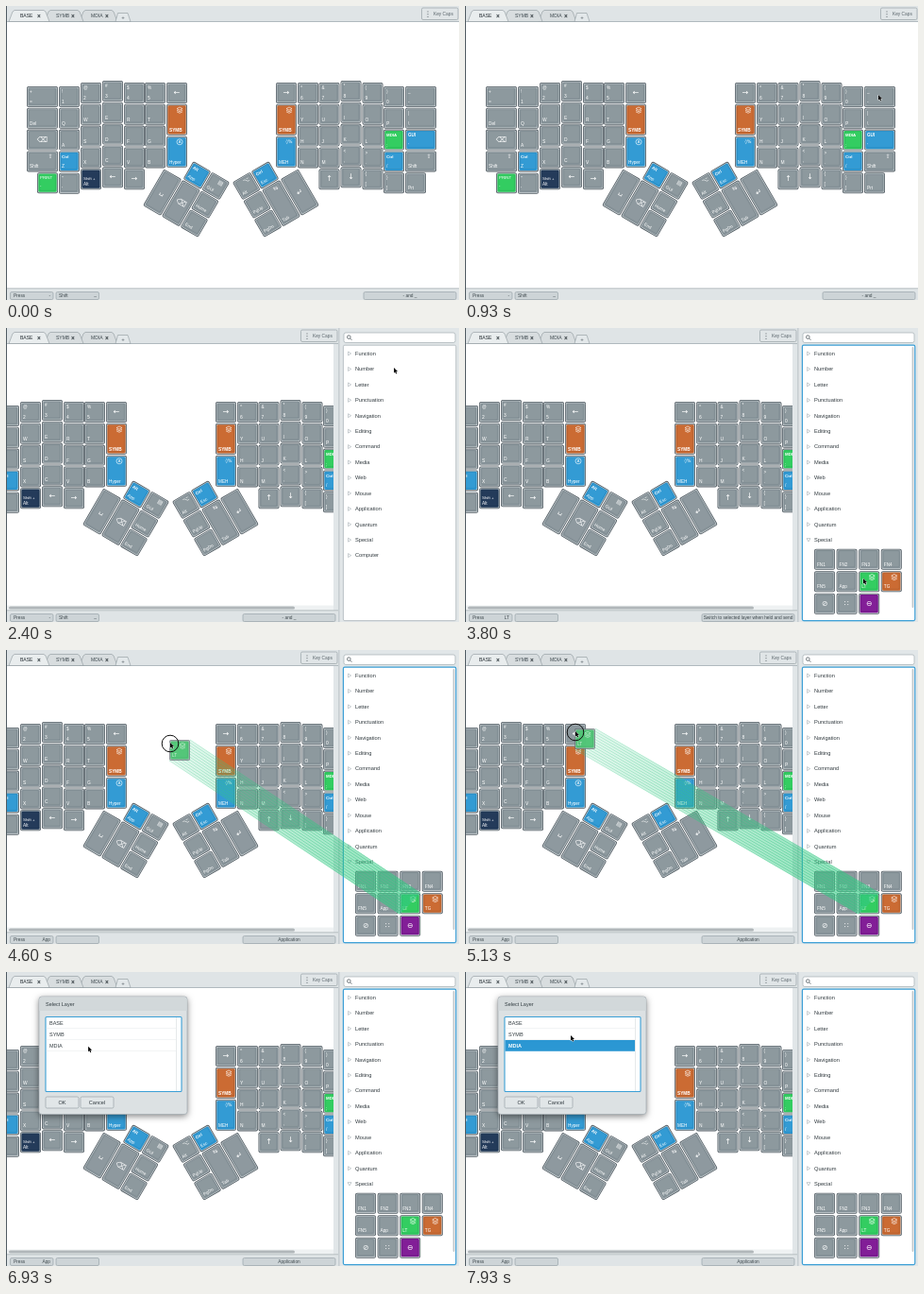
Write an HTML page with a canvas that moves like this. It is 480x311 px and loops after 8000 ms.

```html
<!DOCTYPE html>
<html lang="en">
<head>
<meta charset="utf-8">
<title>Keyboard layout editor</title>
<style>
html, body { margin: 0; width: 100%; height: 100%; overflow: hidden; background: #fff; }
canvas { display: block; width: 480px; height: 311px; }
</style>
</head>
<body>
<canvas id="stage"></canvas>
<script>
const W = 480, H = 311, LOOP = 8000;
const canvas = document.getElementById('stage');
const ctx = canvas.getContext('2d');
const dpr = window.devicePixelRatio || 1;
canvas.width = W * dpr;
canvas.height = H * dpr;

const SANS = '"Liberation Sans", Arial, sans-serif';
const SYMBOLS = '"DejaVu Sans", sans-serif';
const CENTERED = '←→↑↓⌫␣↵⊘⊖∷';
const COLORS = {
  grey: '#89959b', blue: '#2b97d3', orange: '#c9652b',
  green: '#2bcb5b', navy: '#1c3454', purple: '#7d1593'
};

// Times of the hard changes.
const T = {
  cursor: 930, hover: 1670, panel: 2070, expand: 3000, overKey: 3400,
  press: 4130, drag: 4230, app: 4300, drop: 5270, menu: 5400, dialog: 6400, pick: 7270
};

// Pointer keyframes: time, x, y.
const PATH = [
  [930, 438, 94], [1600, 455, 12], [2070, 455, 12], [2380, 411, 42], [2650, 411, 42],
  [2930, 364, 223], [3080, 364, 223], [3480, 422, 265], [4230, 422, 265], [4570, 174, 98],
  [4680, 174, 98], [5080, 117, 86], [5400, 117, 86], [5800, 128, 86], [6400, 128, 86],
  [7130, 78, 77], [7350, 78, 77], [7760, 112, 67], [8000, 112, 67]
];

// Each key is "top~bottom~corner~colour"; a column is x, y, width, then its keys.
const COLUMNS = [
  [22, 85, 33, '+~=', '~Del', '⌫', '~Shift~⇧'],
  [56, 85, 22, '!~1', '~Q', '~A', 'Ctrl~Z~~blue', '"~\''],
  [79, 81, 22, '@~2', '~W', '~S', '~X', 'Shift +~Alt~~navy'],
  [102, 79, 22, '#~3', '~E', '~D', '~C', '←'],
  [125, 81, 22, '$~4', '~R', '~F', '~V', '→'],
  [147, 81, 22, '%~5', '~T', '~G', '~B'],
  [309, 81, 22, '^~6', '~Y', '~H', '~N'],
  [331.5, 81, 22, '&~7', '~U', '~J', '~M', '↑'],
  [354.5, 79, 22, '*~8', '~I', '~K', '<~,', '↓'],
  [377.5, 81, 22, '(~9', '~O', '~L', '>~.', '{~['],
  [400, 85, 22, ')~0', '~P', 'MDIA~;~~green', 'Ctrl~/~~blue', '}~]'],
  [423, 85, 33, '_~-', '|~\\', 'GUI~\'~~blue', '~Shift~⇧']
];
const PALETTE = [
  ['~FN1', '~FN2', '~FN3', '~FN4'],
  ['~FN5', '~App', '~LT~L~green', '~TG~L~orange'],
  ['⊘', '∷', '⊖~~~purple']
];
const GROUPS = ['Function', 'Number', 'Letter', 'Punctuation', 'Navigation', 'Editing', 'Command',
  'Media', 'Web', 'Mouse', 'Application', 'Quantum', 'Special', 'Computer'];

function box(x, y, w, h, r, fill, stroke, line = 0.7) {
  ctx.beginPath();
  ctx.roundRect(x, y, w, h, r);
  if (fill) { ctx.fillStyle = fill; ctx.fill(); }
  if (stroke) { ctx.strokeStyle = stroke; ctx.lineWidth = line; ctx.stroke(); }
}

function poly(points, fill, stroke, line = 0.7) {
  ctx.beginPath();
  points.forEach(([x, y]) => ctx.lineTo(x, y));
  if (fill) { ctx.closePath(); ctx.fillStyle = fill; ctx.fill(); }
  if (stroke) { ctx.strokeStyle = stroke; ctx.lineWidth = line; ctx.stroke(); }
}

function ring(x, y, r, stroke, line) {
  ctx.beginPath();
  ctx.arc(x, y, r, 0, 7);
  ctx.strokeStyle = stroke;
  ctx.lineWidth = line;
  ctx.stroke();
}

function text(s, x, y, size, color, align = 'left', font = SANS, weight = '') {
  ctx.font = `${weight} ${size}px ${font}`;
  ctx.textAlign = align;
  ctx.textBaseline = 'middle';
  ctx.fillStyle = color;
  ctx.fillText(s, x, y);
}

function shadowed(blur, draw) {
  ctx.save();
  ctx.shadowColor = 'rgba(0,0,0,.5)';
  ctx.shadowBlur = blur * dpr;
  ctx.shadowOffsetY = 2 * dpr;
  draw();
  ctx.restore();
}

function layersIcon(x, y) {
  poly([[x - 3, y - 1.2], [x, y - 2.8], [x + 3, y - 1.2], [x, y + 0.4], [x - 3, y - 1.2]], null, '#fff', 0.6);
  for (const d of [0.4, 2]) poly([[x - 3, y + d], [x, y + d + 1.5], [x + 3, y + d]], null, '#fff', 0.6);
}

function key(x, y, w, h, spec) {
  const [top, bottom = '', corner = '', color = 'grey'] = spec.split('~');
  box(x, y, w, h, 2, '#566067');
  box(x + 0.8, y + 0.8, w - 1.6, h - 1.6, 1.5, '#c3cacd');
  box(x + 1.4, y + 1.4, w - 2.8, h - 2.8, 1.4, COLORS[color]);
  box(x + 2.6, y + 2, w - 5.2, h - 5, 1.4, 'rgba(255,255,255,.04)', 'rgba(40,55,65,.18)', 0.5);
  if (CENTERED.includes(top) && top) {
    text(top, x + w / 2, y + h / 2, 8, '#fff', 'center', SYMBOLS);
  } else {
    const size = top.length > 3 ? 4.4 : 4.6;
    const weight = color === 'grey' ? '' : 'bold';
    const near = color === 'navy' ? 10.5 : 6;
    text(top, x + 3, y + near, size, '#fff', 'left', SANS, top.length > 4 ? '' : weight);
    text(bottom, x + 3, y + h - 5.4, bottom.length > 1 ? 4.7 : 4.9, '#fff', 'left', SANS, bottom === 'SYMB' ? 'bold' : '');
  }
  const cx = x + w - 8, cy = y + 6;
  if (corner === 'L') layersIcon(cx, cy);
  else if (corner === 'A') {
    ring(cx, cy, 3, '#fff', 0.6);
    text('A', cx, cy + 0.2, 4, '#fff', 'center');
  } else text(corner, cx, cy, corner.length > 1 ? 5 : 6, '#fff', 'center', SYMBOLS);
}

function thumbs(x, y, side, keys) {
  const p = 22.8;
  ctx.save();
  ctx.translate(x, y);
  ctx.rotate(side * Math.PI / 6);
  keys.forEach(([col, row, spec, tall]) =>
    key(side * col * p - 10.9, row * p - 10.9, 21.8, tall ? 44.6 : 21.8, spec));
  ctx.restore();
}

function keyboard() {
  for (const [x, y, w, ...keys] of COLUMNS) {
    keys.forEach((spec, i) => {
      const last = i === 4;
      const shift = last && x === 56 ? 0.5 : 0;
      key(x, y + i * 22.8 + shift, last ? 22 : w, 22, spec);
    });
  }
  key(33, 176.2, 22, 22, 'PRINT~`~~green');
  key(423, 176.2, 22, 22, '~Prt');
  [[170, '←', '~Hyper~A~blue'], [286, '→', '~MEH~◊%~blue']].forEach(([x, arrow, mod]) => {
    key(x, 81, 22, 22, arrow);
    key(x, 103.8, 22, 33, '~SYMB~L~orange');
    key(x, 137.8, 22, 33, mod);
  });
  thumbs(202.5, 179, 1, [
    [0, 0, 'Alt~App~~blue'], [1, 0, '~GUI~▤'], [-1, 1, '␣', 1], [0, 1, '⌫', 1],
    [1, 1, '~Home'], [1, 2, '~End']
  ]);
  thumbs(274.5, 179, -1, [
    [1, 0, '~Alt~⌥'], [0, 0, 'Ctrl~Esc~~blue'], [1, 1, '~PgUp'], [1, 2, '~PgDn'],
    [0, 1, '~Tab~⇆', 1], [-1, 1, '↵', 1]
  ]);
}

function tab(x, r, label, active) {
  const fill = active ? '#e9edee' : '#d8dddf';
  poly([[x, 16.5], [x + 4, 6], [x + 6, 4.5], [r - 6, 4.5], [r - 4, 6], [r, 16.5]], fill, '#8e989d', 0.6);
  text(label, x + 12, 11, 5, active ? '#20282d' : '#3c474d');
  text('×', r - 11, 11, 6.5, '#30393e', 'center', SANS, 'bold');
}

function tabBar(right, hover) {
  ctx.fillStyle = '#dfe4e6';
  ctx.fillRect(0, 0, right, 17);
  ctx.fillStyle = '#a5afb4';
  ctx.fillRect(0, 16, right, 0.8);
  tab(78, 118, 'MDIA');
  tab(41, 82, 'SYMB');
  tab(3, 46, 'BASE', true);
  poly([[116, 16.5], [118.5, 7.5], [129, 7.5], [132, 16.5]], '#e3e8ea', '#8e989d', 0.6);
  text('+', 124, 12.2, 6, '#4b555a', 'center');
  box(right - 39.5, 2, 38.5, 12.5, 1.5, hover ? '#c5cccf' : '#e0e5e7', '#98a2a7');
  ctx.fillStyle = '#5f696e';
  for (const y of [5.5, 8.2, 10.9]) ctx.fillRect(right - 33.5, y, 1, 1);
  text('Key Caps', right - 27, 8.6, 4.8, hover ? '#7a868c' : '#59646a');
}

function statusBar(right, t) {
  ctx.fillStyle = '#dfe4e6';
  ctx.fillRect(0, 298.5, right, 12.5);
  ctx.fillStyle = '#a5afb4';
  ctx.fillRect(0, 298.5, right, 0.7);
  const app = t >= T.app, layer = t >= T.overKey;
  const cell = (x, w) => box(x, 302.5, w, 8, 1.5, '#cdd4d7', '#9aa4a9');
  cell(4.5, 45.5);
  cell(53, 45.5);
  cell(right - 101, 98);
  const ink = '#3e484d';
  text('Press', 8, 307, 4.8, ink);
  text(app ? 'App' : layer ? 'LT' : '-', 47, 307, 4.8, ink, 'right');
  if (!layer) {
    text('Shift', 56, 307, 4.8, ink);
    text('_', 96, 306, 4.8, ink, 'right');
  }
  const note = app ? 'Application' : layer ? 'Switch to selected layer when held and send' : '- and _';
  text(note, right - 52, 307, 4.8, ink, 'center');
}

function panel(t) {
  const open = t >= T.expand;
  ctx.fillStyle = '#e1e6e8';
  ctx.fillRect(352, 0, 128, H);
  ctx.fillStyle = '#aeb7bb';
  ctx.fillRect(352.5, 0, 0.8, H);
  box(358, 5, 118, 10.5, 2, '#fff', '#a4aeb3');
  ring(363.3, 9.6, 1.8, '#4d575c', 0.8);
  poly([[364.6, 11], [366.4, 12.8]], null, '#4d575c', 0.8);
  box(357.4, 18.2, 119.4, 291.4, 1.5, '#fff', open ? '#3b9fd6' : '#a4aeb3', open ? 1.2 : 0.7);
  GROUPS.forEach((name, i) => {
    if (open && i > 12) return;
    const y = 27 + i * 16.43;
    const tri = open && i === 12
      ? [[362, y - 1.5], [366, y - 1.5], [364, y + 1.8], [362, y - 1.5]]
      : [[362.6, y - 2], [365.6, y], [362.6, y + 2], [362.6, y - 2]];
    poly(tri, null, '#a0aaaf', 0.6);
    text(name, 370, y + 0.3, 5.7, '#30393e');
  });
  if (open) {
    PALETTE.forEach((row, r) => row.forEach((spec, c) =>
      key(370 + c * 23.6, 233.7 + r * 23.5, 22, 22, spec)));
    box(473.6, 20, 1.8, 276, 0.9, '#c3c9cc');
  }
}

function dragTrail(p) {
  const src = [417.2, 257.2], dst = [p[0] - 1, p[1] - 3];
  const shade = (a, b) => {
    const g = ctx.createLinearGradient(dst[0], dst[1], src[0], src[1]);
    g.addColorStop(0, `rgba(50,200,130,${a})`);
    g.addColorStop(1, `rgba(50,200,130,${b})`);
    return g;
  };
  const at = (o, dx, dy) => [o[0] + dx, o[1] + dy];
  poly([at(dst, 0, 22), at(dst, 22, 0), at(src, 22, 0), at(src, 0, 22)], shade(0.1, 0.55));
  const lines = shade(0.35, 0.8);
  for (let i = 0; i <= 12; i++) {
    const dx = 22 * i / 12, dy = 22 - dx;
    poly([at(dst, dx, dy), at(src, dx, dy)], null, lines, 0.7);
  }
  ctx.save();
  ctx.globalAlpha = 0.72;
  key(dst[0], dst[1], 22, 22, '~LT~L~green');
  ctx.restore();
}

function menu() {
  shadowed(4, () => box(106.5, 79, 82.5, 18, 1.5, '#e4e9eb'));
  box(108, 81, 79.5, 14, 0.5, '#2b97d3');
  text('Replace and Copy', 117.5, 88.2, 5.7, '#fff');
}

function dialog(t) {
  shadowed(7, () => box(35, 26, 157, 124.5, 3, '#dce1e3'));
  box(35, 26, 157, 124.5, 3, null, '#a2abb0');
  box(35.4, 26.4, 156.2, 14.6, [3, 3, 0, 0], '#d2d8da');
  text('Select Layer', 42, 34, 5.5, '#343e43');
  box(42, 47.5, 144, 79, 1, '#fff', '#3b9fd6', 1.1);
  const picked = t >= T.pick;
  ['BASE', 'SYMB', 'MDIA'].forEach((name, i) => {
    const y = 48 + i * 12, on = picked && i === 2;
    ctx.fillStyle = on ? '#2b97d3' : '#e4e8ea';
    if (on) ctx.fillRect(42.6, y, 137.4, 11.8);
    else ctx.fillRect(42.6, y + 11.5, 137.4, 0.5);
    text(name, 46, y + 6, 5.5, on ? '#fff' : '#30393e', 'left', SANS, on ? 'bold' : '');
  });
  ctx.fillStyle = '#d5dadc';
  ctx.fillRect(180.2, 48, 0.6, 78);
  [[42, 'OK'], [79, 'Cancel']].forEach(([x, label]) => {
    box(x, 132, 35, 12, 1.5, '#e1e6e8', '#98a2a7');
    text(label, x + 17.5, 138.3, 5.6, '#30393e', 'center');
  });
}

function pointerAt(t) {
  const i = Math.max(1, PATH.findIndex(p => p[0] > t));
  const [t0, x0, y0] = PATH[i - 1], [t1, x1, y1] = PATH[i];
  const k = Math.min(1, Math.max(0, (t - t0) / (t1 - t0)));
  const e = k * k * (3 - 2 * k);
  return [x0 + (x1 - x0) * e, y0 + (y1 - y0) * e];
}

function pointer([x, y]) {
  const shape = [[0, 0], [0, 5.6], [1.3, 4.5], [2.2, 6.6], [3.2, 6.1], [2.3, 4.1], [4, 4], [0, 0]];
  const pts = shape.map(([dx, dy]) => [x + dx, y + dy]);
  poly(pts, null, 'rgba(255,255,255,.8)', 1);
  poly(pts, '#000');
}

function draw(t) {
  const open = t >= T.panel, right = open ? 352 : 480;
  const p = pointerAt(t);
  ctx.setTransform(dpr, 0, 0, dpr, 0, 0);
  ctx.fillStyle = '#fff';
  ctx.fillRect(0, 0, W, H);

  ctx.save();
  ctx.beginPath();
  ctx.rect(0, 17, open ? 347 : 480, 282);
  ctx.clip();
  if (open) ctx.translate(-64, -3);
  keyboard();
  ctx.restore();

  if (open) {
    ctx.fillStyle = '#e1e6e8';
    ctx.fillRect(347, 17, 5, 282);
    ctx.fillStyle = '#eef1f2';
    ctx.fillRect(1, 293.5, 346, 5);
    box(3, 294.5, 303, 3, 1.5, '#b0b6b9');
  }
  tabBar(right, !open && t >= T.hover);
  statusBar(right, t);
  if (open) panel(t);
  ctx.fillStyle = '#505b62';
  ctx.fillRect(0, 0, 1, H);

  if (t >= T.drag && t < T.drop) dragTrail(p);
  if (t >= T.menu && t < T.dialog) menu();
  if (t >= T.dialog) dialog(t);
  if (t >= T.press && t < T.drop) ring(p[0], p[1] + 1, 8.8, '#111', 1);
  if (t >= T.cursor) pointer(p);
}

const start = performance.now();
function tick() {
  draw((performance.now() - start) % LOOP);
  requestAnimationFrame(tick);
}
tick();
</script>
</body>
</html>
```
